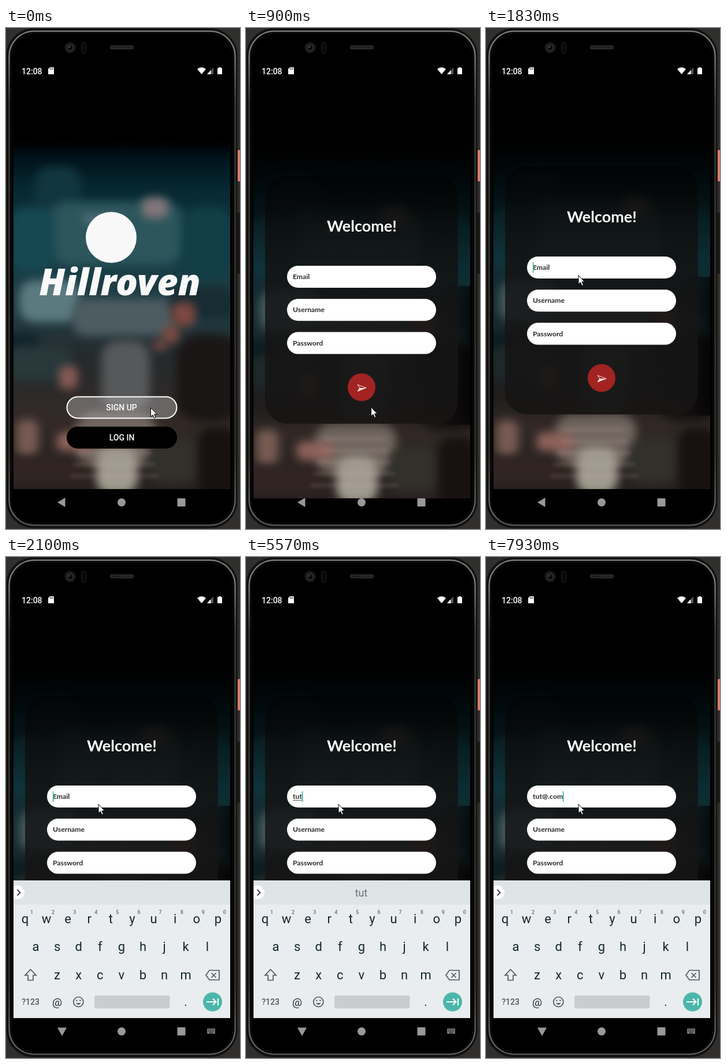
Animation of 405x866 px, one loop 8 s. Source, as an HTML page with a canvas:

```html
<!DOCTYPE html>
<html lang="en">
<head>
<meta charset="utf-8">
<title>Sign-up demo</title>
<style>
html, body { margin: 0; width: 100%; height: 100%; overflow: hidden; background: #302f2d; }
canvas { display: block; }
</style>
</head>
<body>
<canvas id="stage" width="405" height="866"></canvas>
<script>
const LOOP = 8000;
const stage = document.getElementById('stage');
let ctx = stage.getContext('2d');

// Step tracks: [start ms, ...values]
const pointer = [[0, 250, 656], [780, 241, 656], [900, 216, 655], [1020, 196, 592], [1140, 163, 470],
  [1260, 148, 400], [1410, 153, 414], [1530, 158, 427], [1680, 159.5, 427]];
const slide = [[900, 16], [1020, 4], [1140, 0]];
const typed = [[0, ''], [3060, 't'], [3210, 'tu'], [3490, 'tut'], [7110, 'tut@'],
  [7390, 'tut@.'], [7510, 'tut@.c'], [7660, 'tut@.co'], [7930, 'tut@.com']];
const caretFlips = [1830, 2250, 2810, 4050, 4420, 4980, 5570, 5970, 6520, 6960, 7110];

const at = (track, t) => track.filter(step => step[0] <= t).pop().slice(1);

function box(x, y, w, h, r, fill, stroke, lineWidth = 1) {
  ctx.beginPath();
  ctx.roundRect(x, y, w, h, r);
  paint(fill, stroke, lineWidth);
}

function disc(x, y, r, fill, stroke, lineWidth = 1) {
  ctx.beginPath();
  ctx.arc(x, y, r, 0, Math.PI * 2);
  paint(fill, stroke, lineWidth);
}

function shape(path, fill, stroke, lineWidth = 1) {
  const p = new Path2D(path);
  if (fill) { ctx.fillStyle = fill; ctx.fill(p); }
  if (stroke) { ctx.strokeStyle = stroke; ctx.lineWidth = lineWidth; ctx.stroke(p); }
}

function paint(fill, stroke, lineWidth) {
  if (fill) { ctx.fillStyle = fill; ctx.fill(); }
  if (stroke) { ctx.strokeStyle = stroke; ctx.lineWidth = lineWidth; ctx.stroke(); }
}

function text(value, x, y, font, color, align = 'center') {
  ctx.font = font;
  ctx.fillStyle = color;
  ctx.textAlign = align;
  ctx.fillText(value, x, y);
}

function linear(x0, y0, x1, y1, stops) {
  const g = ctx.createLinearGradient(x0, y0, x1, y1);
  stops.forEach(([pos, color]) => g.addColorStop(pos, color));
  return g;
}

function clipped(x, y, w, h, draw) {
  ctx.save();
  ctx.beginPath();
  ctx.rect(x, y, w, h);
  ctx.clip();
  draw();
  ctx.restore();
}

// Renders once into a layer and returns it
function layer(draw) {
  const canvas = document.createElement('canvas');
  canvas.width = 405;
  canvas.height = 866;
  const saved = ctx;
  ctx = canvas.getContext('2d');
  draw();
  ctx = saved;
  return canvas;
}

// Soft spots of the blurred street: x, y, half width, half height, colour
const spots = [
  [90, 290, 40, 50, '#12363f'], [190, 355, 120, 55, '#2c555c'], [258, 311, 23, 18, '#817579'],
  [165, 330, 32, 6, '#5f7a80'], [45, 365, 40, 55, '#164852'], [350, 370, 45, 60, '#123e47'],
  [75, 472, 52, 36, '#5b7a80'], [205, 500, 90, 32, '#4d5c61'], [20, 545, 35, 18, '#10252c'],
  [340, 475, 55, 28, '#182c33'], [60, 580, 55, 30, '#29383b'], [350, 605, 55, 75, '#1a1615'],
  [307, 495, 21, 21, '#7d4840'], [285, 530, 14, 14, '#824b42'], [266, 548, 12, 9, '#764a43'],
  [207, 600, 42, 60, '#56585a'], [108, 604, 16, 20, '#865a56'], [37, 708, 19, 31, '#765b52'],
  [75, 765, 70, 22, '#302521'], [190, 710, 70, 45, '#716760'], [120, 715, 32, 16, '#8d625b'],
  [192, 765, 36, 40, '#a19b8f'], [290, 748, 45, 38, '#32302b'], [365, 755, 32, 65, '#171210']
];

const photo = layer(() => {
  ctx.fillStyle = '#000';
  ctx.fillRect(13, 50, 375, 747);
  clipped(13, 190, 375, 607, () => {
    ctx.fillStyle = linear(0, 196, 0, 797, [[0, '#000'], [.05, '#01131b'], [.13, '#062730'],
      [.3, '#143e47'], [.5, '#213b42'], [.62, '#252a2c'], [.8, '#332a27'], [1, '#282120']]);
    ctx.fillRect(13, 190, 375, 607);
    ctx.filter = 'blur(8px)';
    for (const [x, y, rx, ry, color] of spots) box(x - rx, y - ry, rx * 2, ry * 2, Math.min(rx, ry) * .7, color);
    ctx.filter = 'blur(3px)';
    for (let i = 0; i < 5; i++) box(135 - i * 6, 692 + i * 20, 105 + i * 12, 5, 2, 'rgba(195,180,168,.2)');
    ctx.filter = 'none';
  });
});

const dimPhoto = layer(() => {
  ctx.drawImage(photo, 0, 0);
  ctx.fillStyle = linear(0, 200, 0, 690, [[0, 'rgba(0,0,0,.8)'], [.25, 'rgba(0,0,0,.55)'],
    [.4, 'rgba(0,0,0,.3)'], [.6, 'rgba(0,0,0,.25)'], [.9, 'rgba(0,0,0,.3)'], [1, 'rgba(0,0,0,0)']]);
  ctx.fillRect(13, 190, 375, 607);
  ctx.fillStyle = linear(330, 0, 388, 0, [[0, 'rgba(0,0,0,0)'], [1, 'rgba(0,0,0,.65)']]);
  ctx.fillRect(330, 430, 58, 240);
});

const phone = layer(() => {
  ctx.fillStyle = '#302f2d';
  ctx.fillRect(0, 0, 405, 866);
  box(400, 319, 5, 106, 1, '#191918');
  box(401, 211, 6, 54, 1, '#dc7d6c');
  box(1.5, 1.5, 398, 862, 46, '#0d0d0d', '#141413', 2);
  const rim = linear(0, 0, 0, 866, [[0, '#777774'], [.06, '#777774'], [.15, '#3b3b39'],
    [.85, '#353533'], [.96, '#656562'], [1, '#50504e']]);
  box(5.5, 5.5, 391, 854, 43, '#000', rim, 2.5);
  box(9, 9, 384, 847, 40, '#000', '#131313', 1);
  disc(111, 34, 9.5, '#1b1b1b');
  disc(111, 34, 5, '#080808', '#343436', 1.5);
  disc(109.5, 32.5, 1.5, '#55555c');
  box(130.5, 24.5, 8, 20, 4, '#090909', '#222');
  box(180, 30, 41, 7, 3, '#292928');
  for (let x = 183; x < 219; x += 4) box(x, 32, 2, 3, 1, '#151515');
});

function statusBar() {
  text('12:08', 27, 79.5, '500 14px Roboto, sans-serif', '#fff', 'left');
  shape('M76 68H83V80H73V71Z', '#fff');
  for (const x of [76, 78.3, 80.5]) box(x, 69.5, 1, 2.5, 0, '#000');
  shape('M331 71Q338.5 65 346 71L338.5 80Z', '#fff');
  shape('M359 68V80H348Z', '#555');
  shape('M354.5 73V80H348Z', '#fff');
  shape('M368 68H372V69.3H374V80H366V69.3H368Z', '#fff');
}

function navBar(keyboardOpen) {
  const gray = '#999';
  shape(keyboardOpen ? 'M89 813.5H105L97 828Z' : 'M89 820L102.5 812V828Z', gray);
  disc(200, 820, 7, gray);
  box(296.5, 813, 14, 14, 1, gray);
  if (!keyboardOpen) return;
  box(348, 815, 14, 9, 1, '#777');
  for (let i = 0; i < 10; i++) box(349.5 + i % 5 * 2.4, 816.5 + (i > 4) * 2.4, 1.2, 1.2, 0, '#000');
  box(352, 821.5, 6, 1, 0, '#000');
}

function landing(pressed) {
  ctx.drawImage(photo, 0, 0);
  disc(182, 362, 44, '#f8f8f8');
  text('Hillroven', 197, 462, 'italic 800 63px "Open Sans", sans-serif', '#f8f8f8');
  box(105.5, 637.5, 190, 37, 18.5, `rgba(190,190,190,${pressed ? .6 : .4})`, '#fff', 2);
  text('SIGN UP', 200, 661, '500 14px Roboto, sans-serif', '#fff');
  box(105, 689, 191, 38, 19, '#000');
  text('LOG IN', 200.5, 713, '500 14px Roboto, sans-serif', '#fff');
}

const FIELD_FONT = '700 12.2px Lato, sans-serif';
const INK = '#292929';

function form(value, composing, caretOn) {
  ctx.drawImage(dimPhoto, 0, 0);
  box(33, 239, 334, 429, 38, linear(0, 239, 0, 668, [[0, 'rgba(0,0,0,.6)'],
    [.3, 'rgba(16,15,15,.78)'], [.6, 'rgba(21,20,20,.86)'], [1, 'rgba(22,21,20,.92)']]));
  text('Welcome!', 200.5, 335.5, '700 27px Lato, sans-serif', '#fff');
  [value || 'Email', 'Username', 'Password'].forEach((label, i) => {
    const y = 395 + i * 57.3;
    box(71, y, 258, 38, 19, '#fff');
    text(label, 81, y + 23, FIELD_FONT, INK, 'left');
  });
  ctx.font = FIELD_FONT;
  const width = ctx.measureText(value).width;
  if (composing) box(81, 420, width, 1, 0, '#555');
  if (caretOn) box(81 + width - .3, 405, 2, 18, 0, '#58bcb0');
  disc(200, 605, 24, '#a32323');
  shape('M193 600.5L208 606L193 612L197 606Z', null, '#f3dcdc', 1);
  shape('M193 612L197 606H208Z', '#f3dcdc');
}

function keyRow(letters, x0, y) {
  [...letters].forEach((letter, i) => text(letter, x0 + i * 37.1, y, '22px Roboto, sans-serif', '#14272d'));
}

function keyboard(suggestion) {
  box(13, 559, 375, 238, 0, '#e9edf0');
  box(13, 559, 375, 42, 0, '#dfe4e7');
  box(1, 568, 31, 23, 11.5, '#fff');
  shape('M19.5 575L24.5 580L19.5 585', null, '#30363a', 1.8);
  if (suggestion) text(suggestion, 199.5, 586.5, '18px Roboto, sans-serif', '#69737a');
  keyRow('qwertyuiop', 33, 632.5);
  [...'1234567890'].forEach((digit, i) =>
    text(digit, 44.5 + i * 37.1, 617, '500 9px Roboto, sans-serif', '#606a70'));
  keyRow('asdfghjkl', 51.5, 680.5);
  keyRow('zxcvbnm', 88.5, 729.5);
  const gray = '#4c565c';
  shape('M42.5 713L52 723H47V731.5H38V723H33Z', null, gray, 1.7);
  shape('M352 714.5H369V731H352L346 722.8Z', null, gray, 1.7);
  shape('M355.5 719L363.5 727M363.5 719L355.5 727', null, gray, 1.7);
  text('?123', 42.5, 774, '500 14px Roboto, sans-serif', gray);
  text('@', 88.5, 776, '19px Roboto, sans-serif', '#14272d');
  disc(125.3, 769, 8.5, null, gray, 1.7);
  disc(122.3, 766.5, 1.3, gray);
  disc(128.3, 766.5, 1.3, gray);
  shape('M121 771Q125.3 777 129.6 771Z', gray);
  box(153, 758, 130.5, 22.5, 3, '#c9cdd0');
  text('.', 311, 776, '20px Roboto, sans-serif', '#14272d');
  disc(357.5, 769, 16.5, '#4db6ac');
  shape('M347 769H363M358 763.5L363.5 769L358 774.5M367 763V775', null, '#fff', 2);
}

function drawPointer(x, y) {
  ctx.save();
  ctx.translate(x, y);
  shape('M.5 .5V16L4 12.7L6.6 18.5L9 17.4L6.5 11.8H11.3Z', '#fff', '#000');
  ctx.restore();
}

function render(t) {
  const keyboardOpen = t >= 1980;
  const [value] = at(typed, t);
  const composing = value !== '' && !value.includes('@');
  const caretOn = caretFlips.filter(flip => flip <= t).length % 2 === 1;

  ctx.drawImage(phone, 0, 0);
  navBar(keyboardOpen);
  if (t < 900) {
    landing(t >= 780);
  } else {
    const [dy] = at(slide, t);
    ctx.save();
    ctx.translate(0, dy);
    form(value, composing, caretOn);
    ctx.restore();
  }
  statusBar();
  if (keyboardOpen) {
    clipped(13, 558, 375, 239, () => {
      ctx.translate(0, t < 2100 ? 40 : 0);
      keyboard(composing && value);
    });
  }
  drawPointer(...at(pointer, t));
}

const start = performance.now();
function tick() {
  render((performance.now() - start) % LOOP);
  requestAnimationFrame(tick);
}
tick();
</script>
</body>
</html>
```
